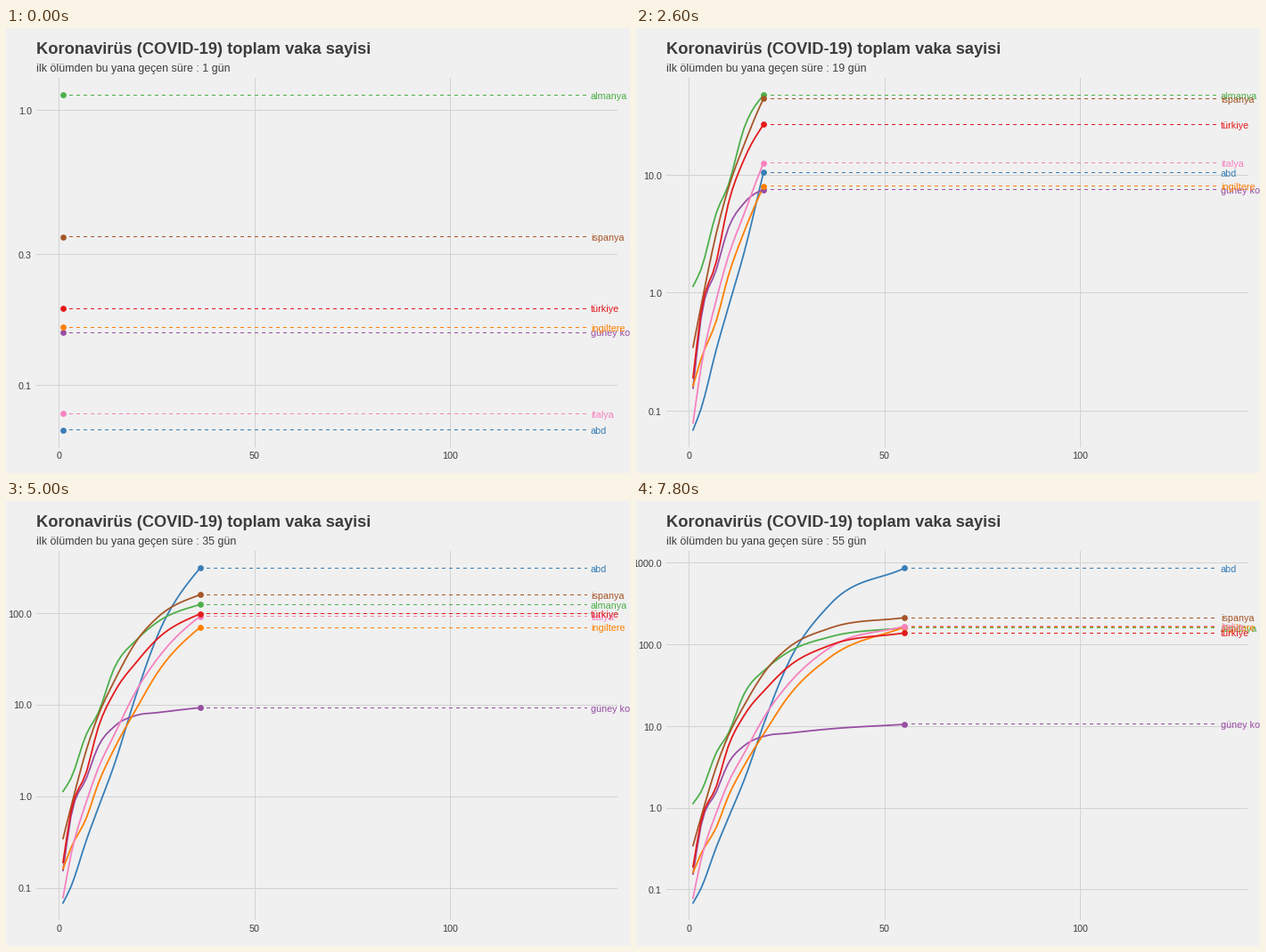
These frames come from a looping animation (700 by 500 pixels, 8 s). A matplotlib script:

```python
import numpy as np
import matplotlib.pyplot as plt
from matplotlib.animation import FuncAnimation

W, H, DPI = 700, 500, 100
PX = 72 / DPI                      # one pixel in points
FRAMES, INTERVAL = 40, 200
DAYS_PER_FRAME = 135 / 97
BG, GRID, INK = "#F0F0F0", "#D2D2D2", "#3C3C3C"
LEFT, RIGHT, TOP, BOTTOM = 34, 685, 56.5, 470
DATA_TOP, DATA_BOTTOM = 75.4, 451.6

# Key points of each curve: thousands of cases on a few days since the first
# death. Countries are listed in drawing order.
KEY_DAYS = np.array([1, 3, 7, 10, 14, 20, 25, 36, 55])
CURVES = [
    ("abd", "#377EB8", [.069, .103, .338, .754, 2.17, 14.2, 55.2, 312, 869]),
    ("almanya", "#4DAF4A", [1.14, 1.57, 4.84, 8.2, 24.8, 52.5, 79.7, 125, 162]),
    ("güney kore", "#984EA3", [.156, .6, 1.6, 3.53, 5.77, 7.76, 8.24, 9.33, 10.6]),
    ("ingiltere", "#FF7F00", [.163, .273, .59, 1.39, 3.27, 9.53, 22.1, 70.3, 165]),
    ("ispanya", "#A65628", [.348, .76, 3.27, 7.7, 17.9, 51.5, 89.2, 160, 215]),
    ("italya", "#F781BF", [.079, .229, .888, 2.04, 4.64, 15.1, 31.5, 92.5, 169]),
    ("türkiye", "#E41A1C", [.191, .67, 1.87, 5.7, 13.5, 30.2, 52.2, 98.7, 140]),
]
DAYS = np.arange(1, KEY_DAYS[-1] + 1)


def hermite(x, xk, yk):
    """Smooth curve through the key points."""
    m = np.gradient(yk, xk)
    i = np.clip(np.searchsorted(xk, x, side="right") - 1, 0, len(xk) - 2)
    h = xk[i + 1] - xk[i]
    t = (x - xk[i]) / h
    return ((1 + 2 * t) * (1 - t) ** 2 * yk[i] + t * (1 - t) ** 2 * h * m[i]
            + t * t * (3 - 2 * t) * yk[i + 1] + t * t * (t - 1) * h * m[i + 1])


def day_x(day):
    return 59.6 + 4.39 * day


def centre(v):
    """Middle of the pixel that holds v, so that thin lines stay crisp."""
    return np.floor(v) + 0.5


plt.rcParams["font.family"] = "Liberation Sans"
fig = plt.figure(figsize=(W / DPI, H / DPI), dpi=DPI, facecolor=BG)
ax = fig.add_axes([0, 0, 1, 1])
ax.set(xlim=(0, W), ylim=(H, 0))
ax.axis("off")


def label(x, y, s, px, color=INK, **kw):
    return ax.text(x, y, s, fontsize=px * PX, color=color, va="baseline", **kw)


def rule(xs, ys):
    return ax.plot(centre(xs), centre(ys), color=GRID, lw=PX, snap=False,
                   zorder=1)[0]


label(34, 29, "Koronavirüs (COVID-19) toplam vaka sayisi", 18.25, weight="bold")
subtitle = label(34, 49, "", 12.35)

for day in (0, 50, 100):
    rule([day_x(day)] * 2, [TOP, BOTTOM])
    label(day_x(day) - 0.5, 484, str(day), 10.8, ha="center")

ticks = [(v, rule([LEFT, RIGHT], [0, 0]),
          label(29, 0, f"{v:.1f}", 10.8, ha="right"))
         for v in (0.1, 0.3, 1, 3, 10, 100, 1000)]

series = []
for name, color, cases in CURVES:
    logs = hermite(DAYS, KEY_DAYS, np.log10(cases))
    line, = ax.plot([], [], color=color, lw=1.8 * PX, zorder=2,
                    solid_joinstyle="round")
    lead, = ax.plot([], [], color=color, lw=PX, zorder=3, snap=False,
                    linestyle=(0, (4, 4)), dash_capstyle="butt")
    dot, = ax.plot([], [], "o", color=color, ms=6.8 * PX, mew=0, zorder=4)
    tag = label(656, 0, name, 10.8, color, zorder=5)
    series.append((logs, line, lead, dot, tag))


def update(k):
    last = int(1 + DAYS_PER_FRAME * (k + 0.5))
    subtitle.set_text("ilk ölümden bu yana geçen süre : "
                      f"{int(1 + DAYS_PER_FRAME * k)} gün")

    # the vertical scale always fits the days drawn so far
    lo = min(s[0][:last].min() for s in series)
    hi = max(s[0][:last].max() for s in series)
    scale = (DATA_BOTTOM - DATA_TOP) / (hi - lo)

    def val_y(v):
        return DATA_BOTTOM - (v - lo) * scale

    for v, grid, text in ticks:
        y = val_y(np.log10(v))
        # the steps of three only show while under three decades fit
        shown = TOP - 0.5 <= y <= BOTTOM and (v not in (0.3, 3) or hi < 1)
        grid.set_visible(shown)
        text.set_visible(shown)
        grid.set_ydata([centre(y)] * 2)
        text.set_y(y + 4.3)

    xs = day_x(DAYS[:last])
    for logs, line, lead, dot, tag in series:
        ys = val_y(logs[:last])
        line.set_data(xs, ys)
        lead.set_data([np.floor(xs[-1]), np.floor(day_x(135))],
                      [centre(ys[-1])] * 2)
        dot.set_data(xs[-1:], ys[-1:])
        tag.set_y(ys[-1] + 4.3)
    return []


anim = FuncAnimation(fig, update, frames=FRAMES, interval=INTERVAL,
                     init_func=lambda: update(0), repeat=True, repeat_delay=0)
plt.show()
```
